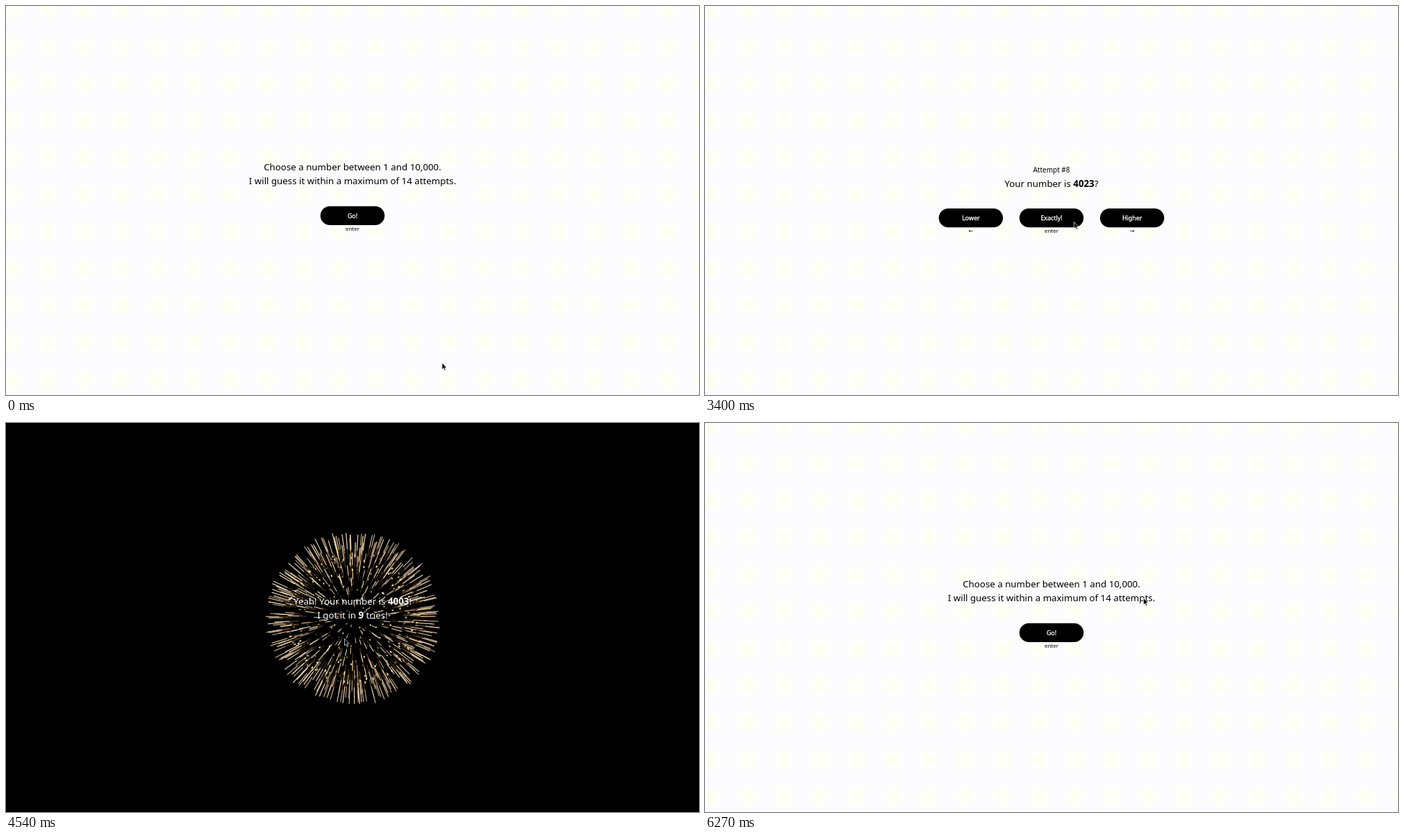
An HTML page with a canvas for the animation above (6.3 s loop, 998 by 561 pixels).

```html
<!DOCTYPE html>
<html lang="en">
<head>
<meta charset="utf-8">
<title>Number guesser</title>
<style>
  html, body { margin: 0; width: 100%; height: 100%; overflow: hidden; }
  body {
    background: radial-gradient(circle, #fefff3 0, #fefff4 8px, #fcfcff 18px) -18.2px -22.2px / 52.44px 53.4px #fcfcff;
  }
  canvas, svg { position: absolute; left: 0; top: 0; width: 998px; height: 561px; display: block; }
  text { font: 13.3px "Noto Sans", "DejaVu Sans", sans-serif; text-anchor: middle; }
  .bold { font-weight: 700; }
  .small { font-size: 9.975px; }
  .label { font-size: 8.87px; font-weight: 500; fill: #fff; stroke: #fff; stroke-width: .3px; }
  .hint { font-size: 7.98px; }
  .night { fill: #fff; }
</style>
</head>
<body>
<canvas id="sky" width="998" height="561"></canvas>
<svg viewBox="0 0 998 561">
  <defs><rect id="pill" x="-46.2" width="92.4" height="27.3" rx="13.65"/></defs>

  <g id="intro">
    <text x="499" y="237">Choose a number between 1 and 10,000.</text>
    <text x="499" y="257">I will guess it within a maximum of 14 attempts.</text>
    <g transform="translate(499 288.8)">
      <use href="#pill"/>
      <text class="label" y="16.8">Go!</text>
      <text class="hint" y="35.4">enter</text>
    </g>
  </g>

  <g id="ask">
    <text class="small" x="499" y="239.5">Attempt #<tspan id="count">1</tspan></text>
    <text x="499" y="260.5">Your number is <tspan class="bold" id="guess">5000</tspan>?</text>
    <g transform="translate(382.9 292)">
      <use href="#pill"/>
      <text class="label" y="16.8">Lower</text>
      <text class="hint" y="35.4">←</text>
    </g>
    <g transform="translate(499 292)">
      <use href="#pill"/>
      <text class="label" y="16.8">Exactly!</text>
      <text class="hint" y="35.4">enter</text>
    </g>
    <g transform="translate(615.1 292)">
      <use href="#pill"/>
      <text class="label" y="16.8">Higher</text>
      <text class="hint" y="35.4">→</text>
    </g>
  </g>

  <g id="win">
    <text x="499" y="262">Yeah! Your number is <tspan class="bold">4003</tspan>!</text>
    <text x="499" y="282">I got it in <tspan class="bold">9</tspan> tries!</text>
  </g>

  <path id="cursor" d="M0 0V9.8L2.2 7.8L3.7 11.3L5.3 10.6L3.8 7.2H6.8Z" stroke="#fff" stroke-width=".7"/>
</svg>

<script>
const LOOP = 6300, NIGHT = 4000, DAY = 5200, RESET = 5470;
const $ = id => document.getElementById(id);
const ctx = $('sky').getContext('2d');

// Click times and answers; each one halves the remaining range
const clicks = [[430], [720, 'low'], [1180, 'high'], [1500, 'high'], [1880, 'low'],
  [2170, 'low'], [2560, 'high'], [2940, 'high'], [3600, 'low']];
let low = 0, high = 10000;
const attempts = clicks.map(([at, answer]) => {
  const mid = (low + high) >> 1;
  if (answer === 'low') high = mid;
  if (answer === 'high') low = mid;
  return { at, guess: (low + high) >> 1 };
});

// Cursor stops: time, x, y
const path = [
  [0, 628, 514.5], [30, 628, 514.5], [390, 505, 303], [460, 505, 303], [690, 388, 309],
  [750, 388, 309], [1060, 602, 306.5], [1540, 602, 306.5], [1830, 388, 309], [2200, 388, 309],
  [2478, 602, 310], [3300, 602, 310], [3560, 388, 314], [3640, 388, 314], [3880, 487.5, 311],
  [5900, 487.5, 311], [6070, 491, 329], [6130, 512, 349], [6270, 631.5, 252.5], [LOOP, 631.5, 252.5]
];

function cursorAt(t) {
  const i = path.findIndex(p => p[0] > t);
  const [t0, x0, y0] = path[i - 1], [t1, x1, y1] = path[i];
  const p = (t - t0) / (t1 - t0), s = p * p * (3 - 2 * p);
  return [x0 + (x1 - x0) * s, y0 + (y1 - y0) * s];
}

let seed = 4003;
function rand() {
  seed = (seed * 1664525 + 1013904223) % 4294967296;
  return seed / 4294967296;
}

// Evenly spread points on a sphere with a little jitter, seen from the front
function shell(n) {
  return Array.from({ length: n }, (_, i) => {
    const z = 1 - 2 * (i + rand()) / n, r = Math.sqrt(1 - z * z);
    const a = i * 2.39996 + (rand() - 0.5) * 0.16;
    const size = 0.97 + rand() * 0.05;
    return { x: Math.cos(a) * r * size, y: Math.sin(a) * r * size, glow: rand() };
  });
}
const stars = shell(440), core = shell(400);

const clamp = v => Math.max(0, Math.min(1, v));
const mix = (a, b, k) => a + (b - a) * k;
const blend = (a, b, k) => a.map((v, i) => mix(v, b[i], k));
const rgba = (c, alpha) => `rgba(${c.map(Math.round)},${alpha})`;

function streak(p, from, to, width, color) {
  ctx.strokeStyle = color;
  ctx.lineWidth = width;
  ctx.beginPath();
  ctx.moveTo(p.x * from, p.y * from);
  ctx.lineTo(p.x * to, p.y * to);
  ctx.stroke();
}

function firework(s) {
  ctx.fillStyle = '#000';
  ctx.fillRect(0, 0, 998, 561);
  ctx.save();
  ctx.translate(497.5 + 4.6 * s, 277 + 7.4 * s + 1.2 * s * s);
  ctx.lineCap = 'round';

  const radius = 178 - 104 * Math.exp(-1.25 * s);
  const open = clamp(s / 0.54), late = clamp((s - 0.54) / 0.6);
  const tail = mix(mix(0.4, 0.3, open), 0.17, late);
  const tailColor = blend([150, 125, 65], [125, 88, 50], open);
  const headColor = blend(blend([236, 218, 150], [250, 232, 196], open), [250, 248, 238], late);
  const headWidth = mix(mix(1, 1.15, open), 2, late);

  for (const p of stars) {
    // The dense core hides the front of the outer shell at first
    if (open < 0.6 && Math.hypot(p.x, p.y) < 0.55 * (1 - open)) continue;
    const start = radius * (1 - tail * (0.7 + p.glow * 0.4));
    const headStart = mix(mix(start, radius, 0.4), radius - 2.5, late);
    streak(p, start, radius, 1, rgba(tailColor, mix(0.7, p.glow * p.glow * 0.75, late)));
    streak(p, headStart, radius, headWidth, rgba(headColor, 0.55 + p.glow * 0.4));
  }

  const coreRadius = 135 - 95 * Math.exp(-1.6 * s);
  const coreColor = blend([232, 164, 138], [246, 228, 160], open);
  for (const p of core) {
    const alpha = clamp(1.1 - open * p.glow * 1.4) * (1 - 0.85 * late);
    streak(p, coreRadius * mix(0.92, 0.985, open), coreRadius, mix(1.8, 2, open), rgba(coreColor, alpha));
  }
  ctx.restore();
}

const show = (id, on) => { $(id).style.display = on ? '' : 'none'; };

function draw(t) {
  const night = t >= NIGHT && t < DAY;
  const intro = t < attempts[0].at || t >= RESET;
  show('intro', intro);
  show('ask', !intro && t < NIGHT);
  show('win', t >= NIGHT && t < RESET);
  show('sky', night);
  $('win').setAttribute('class', night ? 'night' : '');

  const n = attempts.filter(a => a.at <= t).length;
  if (n) {
    $('count').textContent = n;
    $('guess').textContent = attempts[n - 1].guess;
  }
  if (night) firework((t - NIGHT) / 1000);
  $('cursor').setAttribute('transform', `translate(${cursorAt(t)})`);
}

let begin;
function tick(now) {
  begin ??= now;
  draw((now - begin) % LOOP);
  requestAnimationFrame(tick);
}
draw(0);
requestAnimationFrame(tick);
</script>
</body>
</html>
```
